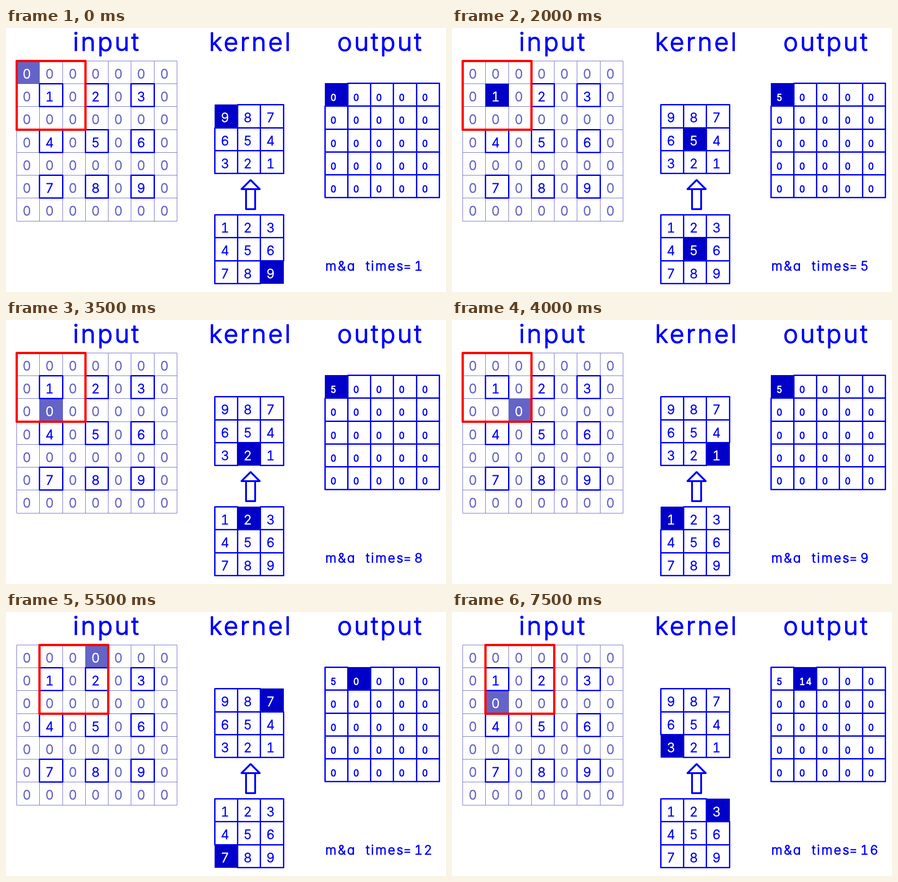
Write an HTML page that moves like this. It is 966 by 580 pixels and loops after 8000 ms.

```html
<!DOCTYPE html>
<html lang="en">
<head>
<meta charset="utf-8">
<title>Transposed convolution</title>
<style>
  html, body { margin: 0; width: 100%; height: 100%; overflow: hidden; background: #fff; }
  svg { display: block; }
  rect, path { fill: none; stroke-linejoin: round; }
  text {
    font-family: Inter, "Open Sans", sans-serif;
    font-weight: 300;
    font-feature-settings: "tnum", "cv11";
    stroke-linejoin: round;
    white-space: pre;
  }
  .title { font-size: 55px; letter-spacing: 4.4px; stroke-width: 1.6px; text-anchor: middle; }
  .digit { font-size: 28.5px; stroke-width: .8px; text-anchor: middle; }
  .small { font-size: 19.5px; stroke-width: 1.3px; letter-spacing: 1.8px; }
  .count { font-size: 28px; stroke-width: 1.1px; letter-spacing: 3px; }
</style>
</head>
<body>
<svg id="stage" width="966" height="580" viewBox="0 0 966 580"></svg>
<script>
const BLUE = '#00f', DARK = '#0000c8', PALE = '#6464c8', RED = '#f00', WHITE = '#fff';
const CELL = 50.25, STEP = 500, STEPS = 16;
const stage = document.getElementById('stage');

const kernel = [1, 2, 3, 4, 5, 6, 7, 8, 9];
const flipped = [...kernel].reverse();
// 3x3 values spread over a 7x7 grid of zeros
const input = Array.from({ length: 49 }, (_, i) => {
  const x = i % 7, y = Math.floor(i / 7);
  return x % 2 && y % 2 ? (y - 1) / 2 * 3 + (x + 1) / 2 : 0;
});

const line = (start, i) => Math.round(start + CELL * i) + .5;

function box(x0, y0, col, row, span, stroke, width, fill = 'none') {
  const x = line(x0, col), y = line(y0, row);
  const w = line(x0, col + span) - x, h = line(y0, row + span) - y;
  return `<rect x="${x}" y="${y}" width="${w}" height="${h}" stroke="${stroke}" stroke-width="${width}" style="fill:${fill}"/>`;
}

// A lit cell is a plain fill without the thick border
const cellBox = (x0, y0, col, row, on, color, width) =>
  box(x0, y0, col, row, 1, color, on ? 1 : width, on ? color : 'none');

const text = (cls, x, y, value, color = BLUE) =>
  `<text class="${cls}" x="${x}" y="${y}" fill="${color}" stroke="${color}">${value}</text>`;

function grid(x0, y0, size, values, lit, small) {
  let cells = '', labels = '';
  values.forEach((value, i) => {
    const col = i % size, row = Math.floor(i / size), on = i === lit;
    cells += cellBox(x0, y0, col, row, on, on ? DARK : BLUE, 3);
    labels += text(small ? 'small' : 'digit', line(x0, col) + (small ? 12 : 22.3),
      line(y0, row) + 38.3, value, on ? WHITE : BLUE);
  });
  return cells + labels;
}

function inputGrid(lit, win) {
  const x0 = 23, y0 = 71.75;
  let thin = '', strong = '', labels = '';
  input.forEach((value, i) => {
    const col = i % 7, row = Math.floor(i / 7), on = i === lit;
    const color = value ? on ? DARK : BLUE : PALE;
    const cell = cellBox(x0, y0, col, row, on, color, value ? 3 : 1);
    if (value) strong += cell; else thin += cell;
    labels += text('digit', line(x0, col) + 22.3, line(y0, row) + 38, value, on ? WHITE : color);
  });
  return thin + strong + labels + box(x0, y0, win, 0, 3, RED, 5);
}

const source = (win, k) => Math.floor(k / 3) * 7 + k % 3 + win;

function outputs(step) {
  const sums = Array(25).fill(0);
  for (let s = 0; s <= step; s++) {
    const win = Math.floor(s / 9), k = s % 9;
    sums[win] += input[source(win, k)] * flipped[k];
  }
  return sums;
}

function draw(step) {
  const win = Math.floor(step / 9), k = step % 9;
  stage.innerHTML =
    text('title', 221.5, 50, 'input') +
    text('title', 537.5, 50, 'kernel') +
    text('title', 822, 50, 'output') +
    inputGrid(source(win, k), win) +
    grid(457.9, 168.4, 3, flipped, k) +
    grid(457.9, 410, 3, kernel, 8 - k) +
    `<path d="M537 334L557 354H517ZM527 354H547V398H527Z" stroke="${BLUE}" stroke-width="4"/>` +
    grid(699.6, 121, 5, outputs(step), win, true) +
    text('count', 701, 533, 'm&amp;a') +
    text('count', 790, 533, 'times') +
    text('count', 872, 533, '=') +
    text('count', 896.5, 533, step + 1);
}

let shown = -1;
function tick(now) {
  const step = Math.floor(now / STEP) % STEPS;
  if (step !== shown) draw(shown = step);
  requestAnimationFrame(tick);
}
draw(0);
requestAnimationFrame(tick);
</script>
</body>
</html>
```
